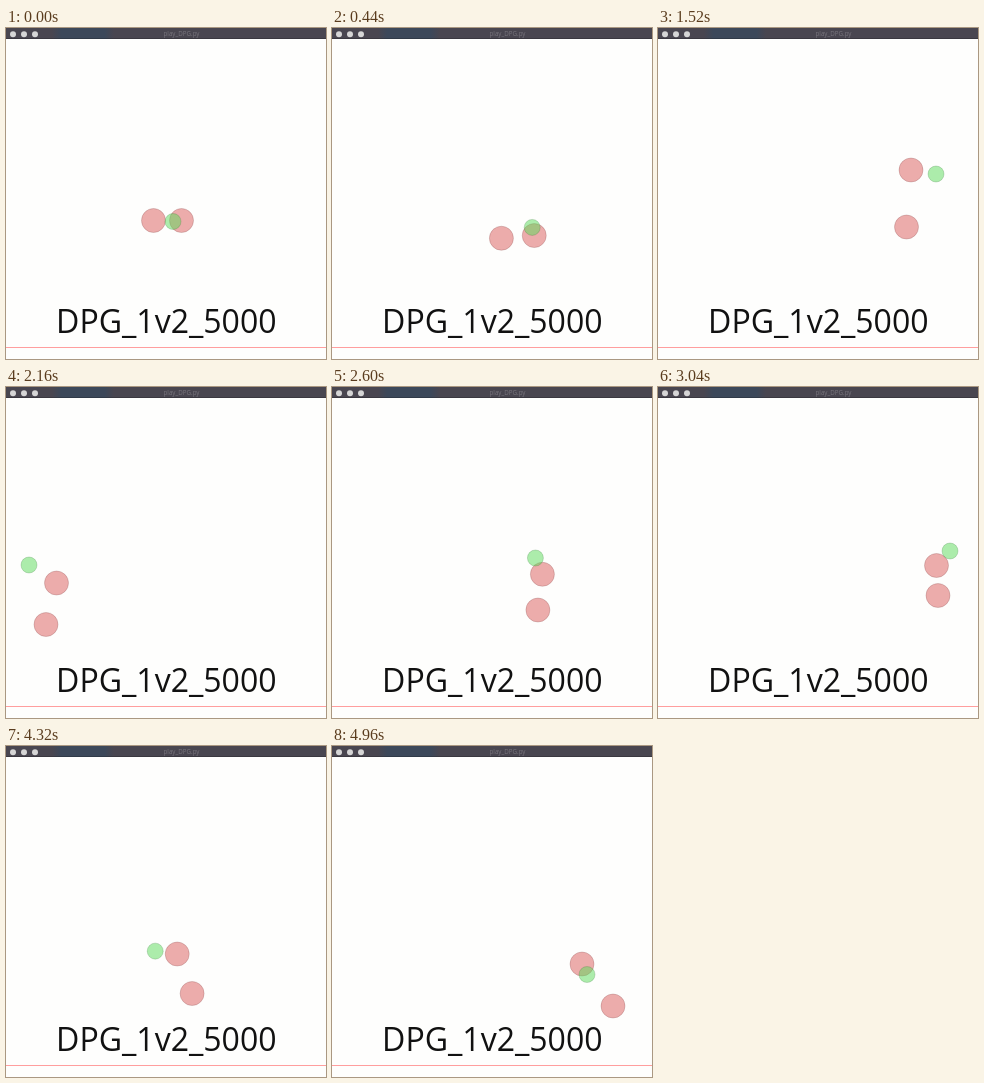
Animation of 320 by 331 pixels, one loop 5000 ms. Source, as an HTML page with a canvas:

```html
<!DOCTYPE html>
<html lang="en">
<head>
<meta charset="utf-8">
<title>play_DPG.py</title>
<style>
  html, body { margin: 0; width: 100%; height: 100%; overflow: hidden; background: #fefefd; }
  canvas { display: block; }
</style>
</head>
<body>
<canvas id="stage" width="320" height="331"></canvas>
<script>
const ctx = document.getElementById('stage').getContext('2d');
const LOOP = 5000, STEP = 40;

const RED = [217, 89, 89], GREEN = [89, 217, 89];
const agents = [
  { name: 'low', r: 12, rgb: RED },
  { name: 'high', r: 12, rgb: RED },
  { name: 'runner', r: 8, rgb: GREEN }
];

// The chase sweeps between these points: [ms, x]
const turns = [
  [-230, 270], [230, 70], [600, 294], [1130, 98], [1640, 308], [2180, 22],
  [2900, 311], [3780, 17], [4080, 38], [4640, 311], [5240, 190]
];

// Formations the three agents pass through
const poses = [
  { t: 0, low: [147.5, 192.5], high: [175.5, 192.5], runner: [167, 193.5] },
  { t: 840, low: [162.5, 225.5], high: [199.5, 220.5], runner: [203, 204.5] },
  { t: 1520, low: [248.5, 199], high: [253, 142], runner: [278, 146] },
  { t: 2160, low: [40, 237.5], high: [50.5, 196], runner: [23, 178] },
  { t: 3040, low: [280, 208.5], high: [278.5, 178.5], runner: [292, 164] },
  { t: 3600, low: [94.5, 232.5], high: [99, 196], runner: [44.5, 177] },
  { t: 4960, low: [281, 260], high: [250, 218], runner: [255, 228.5] }
];

const ease = u => (1 - Math.cos(Math.PI * u)) / 2;
const mix = (a, b, u) => a + (b - a) * u;

// Neighbouring entries around time t and the eased progress between them
function span(list, timeOf, t) {
  let i = 0;
  while (i < list.length - 2 && t >= timeOf(list[i + 1])) i++;
  const [a, b] = [list[i], list[i + 1]];
  return [a, b, ease((t - timeOf(a)) / (timeOf(b) - timeOf(a)))];
}

function sweep(t) {
  const [a, b, u] = span(turns, turn => turn[0], t);
  return mix(a[1], b[1], u);
}

// Each agent rides the sweep at an offset that drifts from pose to pose
function position(name, t) {
  const [a, b, u] = span(poses, pose => pose.t, t);
  const offset = pose => pose[name][0] - sweep(pose.t);
  return [sweep(t) + mix(offset(a), offset(b), u), mix(a[name][1], b[name][1], u)];
}

function disc(x, y, r, fill) {
  ctx.beginPath();
  ctx.arc(x, y, r, 0, 2 * Math.PI);
  ctx.fillStyle = fill;
  ctx.fill();
}

function drawAgent({ name, r, rgb }, t) {
  disc(...position(name, t), r, `rgba(${rgb}, 0.5)`);
  ctx.strokeStyle = `rgba(${rgb.map(c => c / 2)}, 0.3)`;
  ctx.lineWidth = 0.7;
  ctx.stroke();
}

function label(text, x, y, size, color) {
  ctx.font = `${size}px "Open Sans", "Noto Sans", sans-serif`;
  ctx.textAlign = 'center';
  ctx.fillStyle = color;
  ctx.fillText(text, x, y);
}

function drawTitleBar() {
  ctx.fillStyle = '#494650';
  ctx.fillRect(0, 0, 320, 11);
  const glow = ctx.createLinearGradient(46, 0, 108, 0);
  glow.addColorStop(0, 'rgba(60, 72, 90, 0)');
  glow.addColorStop(0.15, 'rgb(60, 72, 90)');
  glow.addColorStop(0.85, 'rgb(60, 72, 90)');
  glow.addColorStop(1, 'rgba(60, 72, 90, 0)');
  ctx.fillStyle = glow;
  ctx.fillRect(46, 0, 62, 11);
  ctx.fillStyle = 'rgba(0, 0, 0, 0.2)';
  ctx.fillRect(0, 10, 320, 1);
  for (const x of [7, 18, 29]) disc(x, 6.3, 3, '#d6d6d6');
  label('play_DPG.py', 175.5, 7.6, 6.2, '#78757d');
}

function draw(t) {
  ctx.fillStyle = '#fefefd';
  ctx.fillRect(0, 0, 320, 331);
  for (const agent of agents) drawAgent(agent, t);
  label('DPG_1v2_5000', 160.3, 305, 32, '#111');
  ctx.fillStyle = '#ff9e9e';
  ctx.fillRect(0, 319, 320, 1);
  drawTitleBar();
}

function tick() {
  const t = performance.now() % LOOP;
  draw(Math.floor(t / STEP) * STEP);
  requestAnimationFrame(tick);
}
tick();
</script>
</body>
</html>
```
